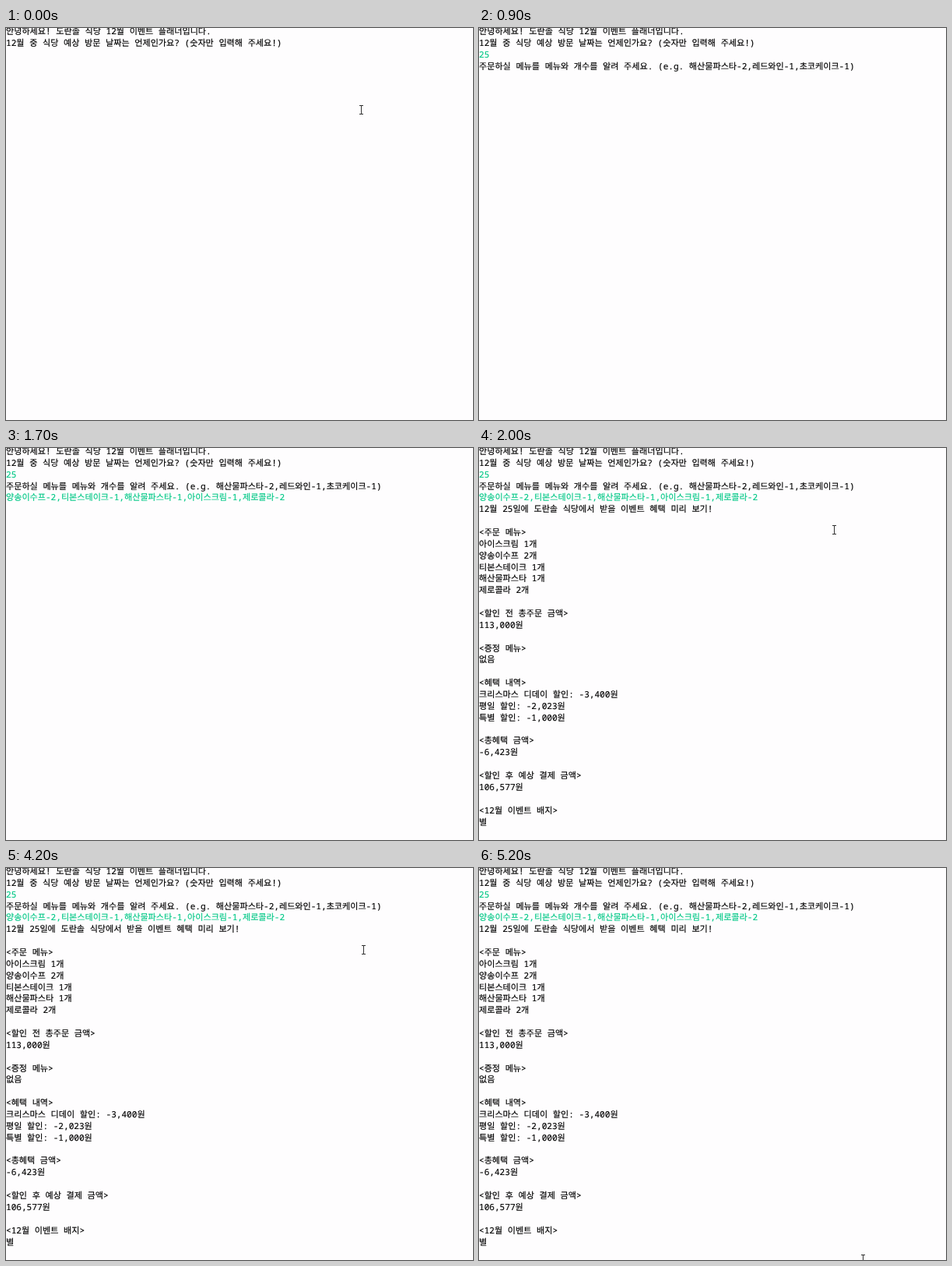
Animation of 600x503 px, one loop 5300 ms. Source, as an HTML page:

```html
<!DOCTYPE html>
<html lang="ko">
<head>
<meta charset="utf-8">
<style>
html, body { margin: 0; width: 100%; height: 100%; overflow: hidden; background: #fefdfe; }
#console {
  position: absolute; left: 0; top: -2px; color: #000;
  font: 11.08px/14.86px "Noto Sans Mono", "Noto Sans CJK KR", "Noto Sans CJK JP", monospace;
  text-rendering: geometricPrecision; -webkit-text-stroke: .15px;
}
#console div { height: 14.86px; white-space: pre; }
#console .input { color: #00c886; }
.caret::after { content: ""; position: absolute; margin-top: -1px; width: 1.5px; height: 15px; background: #000; }
#pointer { position: absolute; left: 0; top: 0; width: 100%; height: 100%; }
</style>
</head>
<body>
<div id="console"></div>
<svg id="pointer"><path id="beam" d="M-2.5-5.5H2.5M-2.5 5.5H2.5M0-5.5V5.5" fill="none" stroke="#333"/></svg>
<script>
const LOOP = 5300, STEP = 100;
const greeting = `안녕하세요! 도란솔 식당 12월 이벤트 플래너입니다.
12월 중 식당 예상 방문 날짜는 언제인가요? (숫자만 입력해 주세요!)`;
const date = "25";
const question = "주문하실 메뉴를 메뉴와 개수를 알려 주세요. (e.g. 해산물파스타-2,레드와인-1,초코케이크-1)";
const order = "양송이수프-2,티본스테이크-1,해산물파스타-1,아이스크림-1,제로콜라-2";
const receipt = `12월 25일에 도란솔 식당에서 받을 이벤트 혜택 미리 보기!

<주문 메뉴>
아이스크림 1개
양송이수프 2개
티본스테이크 1개
해산물파스타 1개
제로콜라 2개

<할인 전 총주문 금액>
113,000원

<증정 메뉴>
없음

<혜택 내역>
크리스마스 디데이 할인: -3,400원
평일 할인: -2,023원
특별 할인: -1,000원

<총혜택 금액>
-6,423원

<할인 후 예상 결제 금액>
106,577원

<12월 이벤트 배지>
별`;

const $ = id => document.getElementById(id);

function addRow(text, className = "") {
  const row = $("console").appendChild(document.createElement("div"));
  row.textContent = text;
  row.className = className;
  return row;
}
const addRows = text => text.split("\n").map(line => addRow(line));

addRows(greeting);
const dateRow = addRow("", "input");
const questionRow = addRow(question);
const orderRow = addRow("", "input");
const receiptRows = addRows(receipt);

const show = (element, on) => element.style.visibility = on ? "visible" : "hidden";

function pointerAt(step) {
  if (step <= 5) { // small arc to the left
    const angle = Math.PI * step / 5;
    return [456.5 + 3 * Math.cos(angle), 105 - 9 * Math.sin(angle)];
  }
  const u = (step - 5) / 5; // swoop out at the bottom
  return [453.5 - 124 * u + 164 * u * u, 105 + 397 * u];
}

function draw() {
  const t = performance.now() % LOOP;
  const between = (start, end) => t >= start && t < end;

  dateRow.textContent = date.slice(0, Math.max(0, Math.floor((t - 600) / STEP)));
  dateRow.classList.toggle("caret", between(500, 900));
  show(questionRow, t >= 900);
  orderRow.textContent = t < 1200 ? "" : order;
  orderRow.classList.toggle("caret", between(1100, 1700));
  receiptRows.forEach(row => show(row, t >= 2000));

  const [x, y] = t < 4200 ? [456.5, 105] : pointerAt(Math.floor((t - 4200) / STEP));
  $("beam").setAttribute("transform", `translate(${x} ${y})`);
  show($("pointer"), !between(500, 2000));
  requestAnimationFrame(draw);
}
draw();
</script>
</body>
</html>
```
